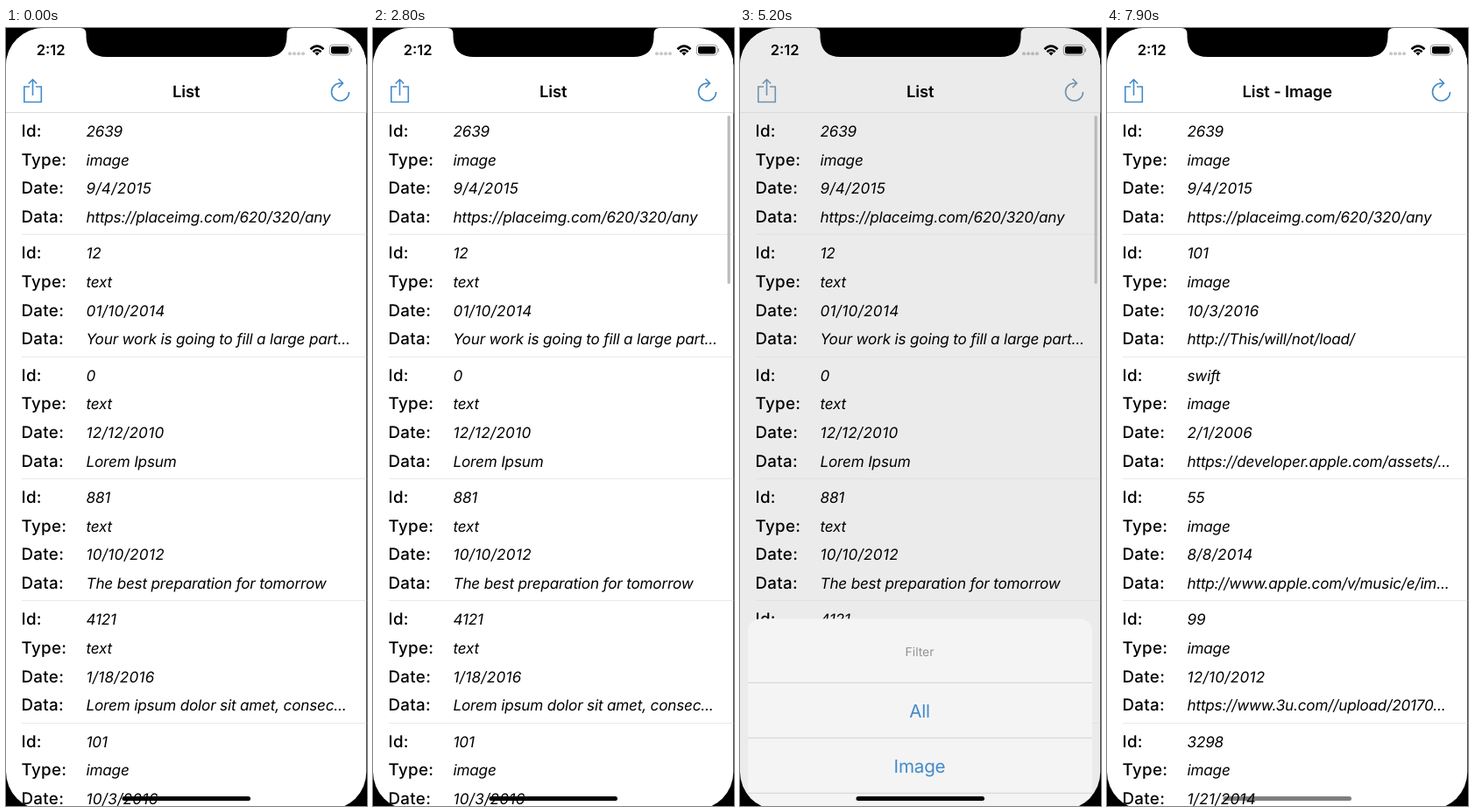
Write an HTML page that moves like this. It is 412 px wide and 888 px high and loops after 8 s.

```html
<!DOCTYPE html>
<html lang="en">
<head>
<meta charset="utf-8">
<title>List</title>
<style>
html, body { margin: 0; width: 100%; height: 100%; overflow: hidden; background: #000; }
svg { display: block; width: 412px; height: 888px; --tint: #428bca; --line: 1; }
text { font: 400 18px Inter, sans-serif; letter-spacing: -.26px; fill: #000; text-rendering: geometricPrecision; }
.label { font-weight: 500; font-size: 18.8px; letter-spacing: .3px; }
.value { font-style: italic; font-size: 17.1px; letter-spacing: -.17px; }
.date { letter-spacing: .3px; }
.title { font-weight: 600; font-size: 18.3px; letter-spacing: -.1px; }
.mid { text-anchor: middle; }
.blue { fill: #428bca; }
.icon { fill: none; stroke: var(--tint); stroke-width: 1.6; }
.sep { stroke: #e9e9e9; stroke-opacity: var(--line); }
.option { font-size: 20.6px; letter-spacing: -.2px; }
</style>
</head>
<body>
<svg viewBox="0 0 412 888">
  <defs>
    <clipPath id="screen"><rect width="411.3" height="892" rx="43"/></clipPath>
    <linearGradient id="photo" x2="0" y2="1">
      <stop stop-color="#b9c3c9"/><stop offset=".55" stop-color="#9a9f98"/><stop offset="1" stop-color="#62665c"/>
    </linearGradient>
  </defs>
  <rect width="412" height="888"/>
  <g clip-path="url(#screen)">
    <rect width="412" height="888" fill="#fff"/>
    <g id="list">
      <rect id="touch" y="97" width="412" height="139" fill="#d9d9d9"/>
      <g id="all"></g>
      <g id="images"></g>
      <rect id="scroll" x="404.5" y="100" width="3.2" height="192" rx="1.6" fill="#bbb"/>
    </g>
    <rect id="shade" y="97" width="412" height="791"/>
    <g id="detail">
      <rect y="97" width="412" height="791" fill="#fff"/>
      <g id="spinner" stroke="#c54747" stroke-width="3.6" stroke-linecap="round"></g>
      <rect id="picture" x="11" y="343" width="390" height="201" fill="url(#photo)"/>
      <g id="quote"></g>
    </g>
    <rect width="412" height="96.5" fill="#fff"/>
    <path d="M0 96.5H412" class="sep" style="stroke:#dcdcdc"/>
    <g id="buttons" class="icon">
      <path id="share" d="M27 67H20.8V84.500H40.3V67H34M30.500 77V59M25.800 63.500L30.500 58.800L35.200 63.500"/>
      <path d="M391.5 73A10 10 0 1 1 381.5 63H384M379.5 58L384.5 63L379.5 68"/>
    </g>
    <text id="heading" class="title mid" x="205.7" y="79"></text>
    <text id="subheading" class="title mid" x="205.5" y="79"></text>
    <g id="back">
      <path d="M21.5 62.5L11.5 72.5L21.5 82.5" class="icon" style="stroke-width:3.2"/>
      <text id="backText" class="blue" x="27.5" y="79" style="font-size:18.3px">List</text>
    </g>
    <text x="34.7" y="31" style="font-weight:600;font-size:16.5px;letter-spacing:0">2:12</text>
    <g id="dots" fill="#c8c8c8"></g>
    <g fill="none" stroke="#000" stroke-width="2.6">
      <path d="M347.5 24.2Q355 17 362.5 24.2M350.4 27.2Q355 22.8 359.6 27.2"/>
      <path d="M352.4 28.6Q355 26.4 357.6 28.6L355 31.4Z" fill="#000" stroke="none"/>
      <rect x="369.3" y="19.3" width="23.4" height="11.8" rx="3.3" stroke="#9a9a9a" stroke-width="1"/>
      <rect x="371" y="21" width="20" height="8.4" rx="1.8" fill="#000" stroke="none"/>
      <path d="M394.3 23.2V27.2" stroke="#9a9a9a" stroke-width="1.4"/>
    </g>
    <rect id="dim" width="412" height="888"/>
    <g id="sheet">
      <rect x="9" y="457.5" width="393" height="324.5" rx="14.5" fill="#f4f4f4"/>
      <rect id="picked" x="9" y="594" width="393" height="62" fill="#e2e2e2"/>
      <text class="mid" x="205" y="500" style="font-size:13.9px;letter-spacing:0;fill:#929292">Filter</text>
      <g id="options"></g>
      <rect x="9" y="791" width="393" height="62.6" rx="14.5" fill="#fff"/>
      <text class="option mid blue" x="205" y="830" style="font-weight:600">Dismiss</text>
    </g>
    <rect id="home" x="132.5" y="877" width="146.5" height="5" rx="2.5"/>
  </g>
  <path d="M85 0Q91.5 0 91.5 7V10Q92 33 115 33H297Q320 33 320.5 10V7Q320.5 0 327 0Z"/>
</svg>
<script>
const LOOP = 8000, ROW = 139.3, WIDTH = 412;
const el = id => document.getElementById(id);
const text = (cls, x, y, s) => `<text class="${cls}" x="${x}" y="${y}">${s}</text>`;
const repeat = (n, f) => Array.from({ length: n }, (_, i) => f(i)).join('');

const names = ['Id:', 'Type:', 'Date:', 'Data:'];
const rows = items => items.map((item, i) => {
  const top = 97 + i * ROW;
  return item.map((value, j) => {
    const y = top + 27 + j * 32.65;
    return text('label', 17.5, y, names[j]) + text(j === 2 ? 'value date' : 'value', 91.5, y, value);
  }).join('') + `<path class="sep" d="M18 ${Math.floor(top + ROW - .4) + .5}H412"/>`;
}).join('');

const first = ['2639', 'image', '9/4/2015', 'https://placeimg.com/620/320/any'];
const broken = ['101', 'image', '10/3/2016', 'http://This/will/not/load/'];
el('all').innerHTML = rows([
  first,
  ['12', 'text', '01/10/2014', 'Your work is going to fill a large part...'],
  ['0', 'text', '12/12/2010', 'Lorem Ipsum'],
  ['881', 'text', '10/10/2012', 'The best preparation for tomorrow'],
  ['4121', 'text', '1/18/2016', 'Lorem ipsum dolor sit amet, consec...'],
  broken
]);
el('images').innerHTML = rows([
  first,
  broken,
  ['swift', 'image', '2/1/2006', 'https://developer.apple.com/assets/...'],
  ['55', 'image', '8/8/2014', 'http://www.apple.com/v/music/e/im...'],
  ['99', 'image', '12/10/2012', 'https://www.3u.com//upload/20170...'],
  ['3298', 'image', '1/21/2014', '']
]);
el('quote').innerHTML = [
  'Your work is going to fill a large part of your',
  'life, and the only way to be truly satisfied is',
  'to do what you believe is great work. And',
  'the only way to do great work is to love what',
  "you do. If you haven't found it yet, keep",
  "looking. Don't settle. As with all matters of",
  "the heart, you'll know when you find it."
].map((s, i) => text('', 17.5, 132.3 + i * 22.2, s)).join('');
el('options').innerHTML = ['All', 'Image', 'Other', 'Text'].map((s, i) =>
  `<path d="M9 ${530.5 + i * 63}H402" stroke="#d2d2d2"/>` +
  text('option mid blue', 205, 570 + i * 63, s)).join('');
el('dots').innerHTML = repeat(4, i => `<circle cx="${324 + i * 5}" cy="29.3" r="2"/>`);
el('spinner').innerHTML = repeat(12, i => `<path d="M0 -10.5V-17.5" transform="translate(204.5 444) rotate(${i * 30})"/>`);
const blades = [...el('spinner').children];

const ramp = (t, a, b) => Math.min(1, Math.max(0, (t - a) / (b - a)));
// critically damped spring, at rest after about half a second
const spring = (t, start) => {
  const s = Math.max(0, t - start) / 60;
  return s > 8.5 ? 1 : 1 - (1 + s) * Math.exp(-s);
};
const between = (t, a, b) => t >= a && t < b;
const fade = (id, v) => el(id).setAttribute('opacity', v);
const move = (id, x, y = 0) => el(id).setAttribute('transform', `translate(${x} ${y})`);

function draw(t) {
  const second = t >= 2600, filtered = t >= 7300;
  const pop = second ? spring(t, 4030) : spring(t, 1750);
  const open = (second ? spring(t, 2930) : spring(t, 250)) - pop;

  move('list', -.3 * WIDTH * open);
  move('detail', WIDTH * (1 - open));
  fade('shade', .1 * open);
  el('touch').setAttribute('y', second ? 97 + ROW : 97);
  fade('touch', t >= (second ? 2850 : 100) ? 1 - pop : 0);
  fade('all', filtered ? 0 : 1);
  fade('images', filtered ? 1 : 0);
  fade('scroll', ramp(t, 2300, 2450) * (1 - ramp(t, 2950, 3150)) +
    ramp(t, 4680, 4880) * (1 - ramp(t, 5150, 5400)));

  // detail page
  fade('quote', second ? 1 : 0);
  fade('picture', between(t, 1300, 2600) ? 1 : 0);
  fade('spinner', t < 1300 ? 1 : 0);
  const head = 7 + Math.floor((t - 1200) * .012);
  blades.forEach((b, i) => {
    const age = ((head - i) % 12 + 12) % 12;
    b.setAttribute('opacity', Math.max(.28, .95 - age * .1));
  });

  // navigation bar
  el('heading').textContent = filtered ? 'List - Image' : 'List';
  el('subheading').textContent = second ? 'Id - 12' : 'Id - 2639';
  move('heading', -163 * open);
  fade('heading', Math.max(0, 1 - 1.5 * open));
  move('subheading', 180 * (1 - open));
  fade('subheading', open);
  move('backText', 163 * (1 - open));
  const pressed = between(t, 1600, 2600) || between(t, 3980, 4900);
  fade('back', open * (pressed ? .2 : 1));
  fade('buttons', 1 - open);
  fade('share', between(t, 4880, 5100) ? .2 : 1);

  // filter sheet
  const up = spring(t, 5100) - spring(t, 6830);
  move('sheet', 0, 435 * (1 - up));
  fade('dim', .16 * up);
  fade('picked', between(t, 6680, 7300) ? 1 : 0);
  const style = document.querySelector('svg').style;
  style.setProperty('--line', 1 - up);
  style.setProperty('--tint', `color-mix(in srgb, #b0b0b0 ${100 * up}%, #428bca)`);
  fade('home', 1 - .5 * ramp(t, 7300, 7500));
}

function tick() {
  draw(performance.now() % LOOP);
  requestAnimationFrame(tick);
}
tick();
</script>
</body>
</html>
```
